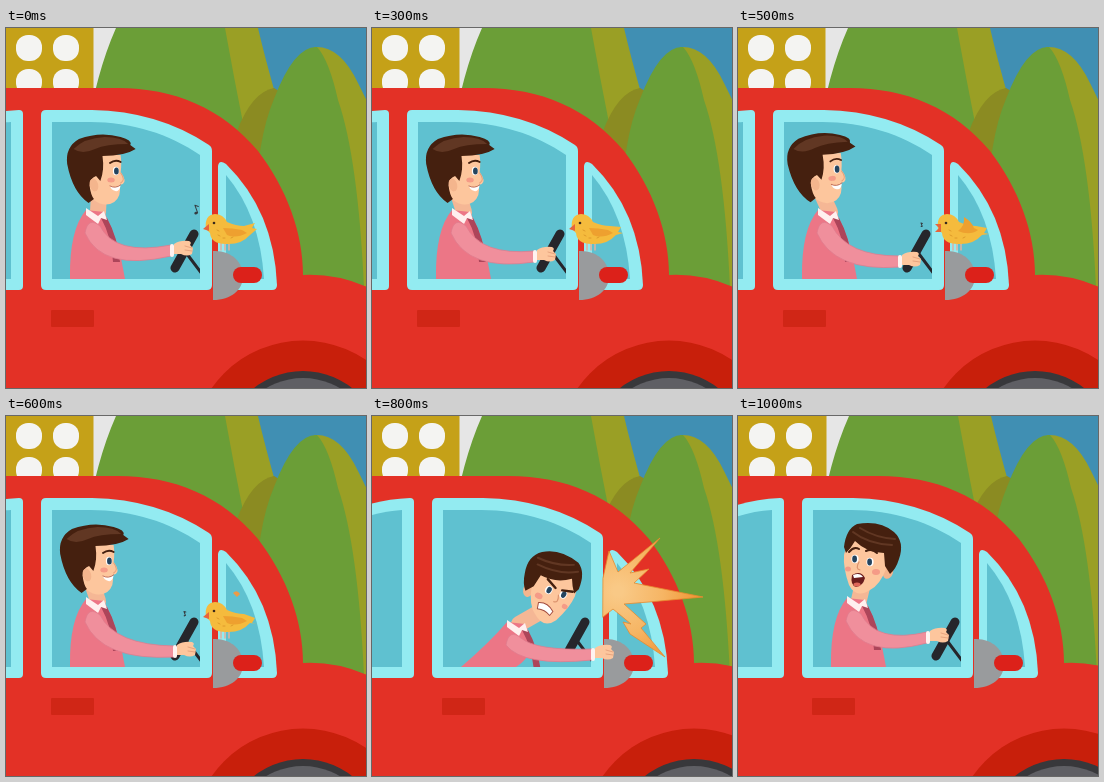
Animation, 360 px wide and 360 px high, one loop 1.1 s. Source, as an HTML page with a canvas:

```html
<!DOCTYPE html>
<html lang="en">
<head>
<meta charset="utf-8">
<title>Driver and bird</title>
<style>
html, body { margin: 0; width: 100%; height: 100%; overflow: hidden; background: #e33126; }
canvas { display: block; width: 360px; height: 360px; }
</style>
</head>
<body>
<canvas id="stage" width="360" height="360"></canvas>
<script>
const ctx = document.getElementById('stage').getContext('2d');
const RED = '#e33126', SKIN = '#fdc69d', HAIR = '#45200f', SHINE = '#613723', INK = '#26262b';
const SHIRT = '#ec7686', SLEEVE = '#f08f9c', GLASS = '#5fc1d0', FRAME = '#93ebf1';
const STEP = 100, LOOP = 1100;

function fill(color, d) {
  ctx.fillStyle = color;
  ctx.fill(new Path2D(d));
}
function line(color, width, d) {
  ctx.strokeStyle = color;
  ctx.lineWidth = width;
  ctx.stroke(new Path2D(d));
}
function oval(color, x, y, rx, ry = rx, turn = 0) {
  ctx.fillStyle = color;
  ctx.beginPath();
  ctx.ellipse(x, y, rx, ry, turn, 0, Math.PI * 2);
  ctx.fill();
}
function box(color, x, y, w, h, r) {
  ctx.fillStyle = color;
  ctx.beginPath();
  ctx.roundRect(x, y, w, h, r);
  ctx.fill();
}
function at(x, y, draw, turn = 0, sx = 1) {
  ctx.save();
  ctx.translate(x, y);
  ctx.rotate(turn);
  ctx.scale(sx, 1);
  draw();
  ctx.restore();
}

// car shift, head x/y, head turn, hand x/y, neck x/y
const poses = [
  [0, 1, 0, 0, 178, 220, 88, 180],
  [0, -2, 0, 0, 177, 222, 88, 180],
  [0, -4, 0, 0, 176, 224, 88, 180],
  [0, -6, 0, 0, 175, 226, 88, 180],
  [0, -8, 0, -.02, 174, 229, 88, 180],
  [0, -9, -1, -.04, 174, 231, 88, 180],
  [0, -6, 2, 0, 181, 233, 88, 181],
  [15, 27, 13, 0, 194, 237, 110, 193],
  [25, 154, 174, .5, 208, 236, 118, 204],
  [27.5, 122, 158, .15, 187, 228, 102, 191],
  [29, 101, 145, 0, 173, 219, 88, 180]
].map(([dx, hx, hy, turn, handX, handY, nx, ny], i) =>
  ({ dx, hx, hy, turn, handX, handY, nx, ny, front: i > 7, angry: i === 7 || i === 8 }));

function scenery() {
  ctx.fillStyle = '#e6e6e6';
  ctx.fillRect(-5, 0, 370, 360);
  ctx.fillStyle = '#c5a118';
  ctx.fillRect(-5, 0, 92.5, 70);
  for (const x of [23, 60]) for (const y of [20, 54]) box('#f4f4f2', x - 13, y - 13, 26, 26, 12);
  fill('#408fb3', 'M240 0H365V150H240Z');
  fill('#9a9f25', 'M215 0H252Q259 30 271 72L300 200H220Z');
  fill('#6b9e37', 'M110 0H219Q228 50 238 100L245 190H80V110Q90 45 110 0Z');
  fill('#8b8b22', 'M268 60Q246 64 231 103L262 150L285 70Z');
  fill('#9a9f25', 'M308 19Q334 17 352 55Q358 67 368 88V270H310Z');
  fill('#6b9e37', 'M311 19Q288 18 268 71Q251 110 248 190L290 260H358Q352 130 332 72Q323 32 311 19Z');
}

function bodywork() {
  fill(RED, 'M-60 60H112C168 60 216 80 252 123C281 161 297 205 297 247Q335 245 372 264V360H-60Z');
  oval('#c81f0b', 297, 424, 111.5);
  oval('#38383b', 297, 422, 79);
  oval('#5f5f64', 297, 422, 72);
  fill(FRAME, 'M-60 102Q-30 84 13 82Q17 82 17 86V258Q17 262 13 262H-60Z');
  fill(GLASS, 'M-60 115Q-30 96 5 94V251H-60Z');
  box('#d02616', 45, 282, 43, 17, 1);
}

const FRONT = 'M46 94H84C126 94 163 106 194 127V251H46Z';
const SIDE = 'M220 147Q254 187 258 251H220Z';

function frames() {
  fill(FRAME, 'M40 82H86Q152 83 203 117Q206 119 206 123V257Q206 262 201 262H40Q35 262 35 257V87Q35 82 40 82Z');
  fill(GLASS, FRONT);
  fill(FRAME, 'M212 138Q213 131 220 136Q268 183 271 257Q271 262 266 262H212Z');
  fill(GLASS, SIDE);
}

function mirror() {
  fill('#999b9d', 'M207 223C225 222 237 234 237 248S225 272 207 272Z');
  box('#dc211a', 227, 239, 29, 16, 8);
}

function wheel() {
  line(INK, 3, 'M181 226L196 246');
  line(INK, 9, 'M188 206L169 240');
}

function torso({ nx, ny, hx, hy, front }) {
  const chin = front ? `${hx - 4} ${hy + 18}` : `${92 + hx} ${165 + hy}`;
  line('#f5b795', 16, `M${nx + 4} ${ny + 4}L${chin}`);
  fill(SHIRT, `M64 251Q${nx - 25} ${ny + 22} ${nx - 8} ${ny + 2}L${nx + 10} ${ny + 4}Q${nx + 25} ${ny + 32} 119 251Z`);
  at(nx, ny, () => {
    fill('#ad455a', 'M7 10L13 10Q24 30 26 54L19 54Q18 30 7 10Z');
    fill('#fff0ef', 'M-8 0L4 8L10 3L13 12L7 10L4 16L-8 7Z');
  });
}

function arm({ nx, ny, handX, handY }) {
  const elbow = Math.min(ny + 56, 243);
  const wx = handX - 13, wy = handY + 2;
  const sleeve = `M${nx + 6} ${ny + 18}Q${nx + 21} ${elbow - 8} ${wx} ${wy - 5}L${wx} ${wy + 6}`
    + `Q${nx + 8} ${elbow + 8} ${nx - 9} ${ny + 25}Q${nx - 6} ${ny + 8} ${nx + 6} ${ny + 18}Z`;
  fill(SLEEVE, sleeve);
  line('#e07d8e', .8, sleeve);
  line('#fff2f0', 4, `M${wx + 1} ${wy - 4}V${wy + 5}`);
  at(handX, handY, () => {
    fill(SKIN, 'M-10 -4Q-4 -8 5 -7Q8 -6 6 -3L9 0L8 6Q3 9 -3 6L-10 6Z');
    line('#e7a47f', 1, 'M1 -2L8 0M1 2L8 3');
  });
}

function sideHead(angry) {
  fill(SKIN, 'M82 127H112Q113 137 112 144Q118 153 114 156L111 157Q113 168 106 174Q97 180 87 172L79 157Z');
  fill(HAIR, 'M62 136Q60 119 73 111Q93 103 112 109Q123 112 121 117L126 121Q116 128 95 128Q97 142 93 153L89 148Q83 150 83 158Q84 167 87 171L82 175Q67 164 62 136Z');
  fill(SHINE, 'M68 121Q78 110 97 109Q113 109 119 116Q98 116 88 121Q76 127 68 121Z');
  oval('#f4b58d', 87, 157, 4, 6.5, -.2);
  oval('#f59b87', 103, 152, 3.5, 2.5);
  oval('#ffffff', 107.5, 143, 2.8, 4.2);
  oval('#24445f', 108, 143, 2.2, 3.6);
  line('#e5a27b', 1, 'M112 145Q117 152 112 155');
  if (angry) {
    line(HAIR, 2.5, 'M101 134L112 140');
    fill('#ffffff', 'M100 162Q106 157 112 161L110 167Q104 165 99 168Z');
    line('#a34c3f', 1, 'M100 162Q106 157 112 161L110 167Q104 165 99 168Z');
  } else {
    line(HAIR, 1.8, 'M102 135Q107 131 112 134');
    fill('#ffffff', 'M102 158Q107 161 112 157Q111 164 107 163Q103 162 102 158Z');
    line('#b45b49', .8, 'M102 158Q107 161 112 157');
  }
}

function frontHead(angry) {
  oval('#f4b58d', 20, 11, 5, 7, .3);
  fill(SKIN, 'M-20 -22H18V8Q12 24 2 29Q-12 38 -19 24Q-25 7 -24 -6Z');
  fill(HAIR, 'M-24 -14Q-22 -32 -11 -37Q12 -41 26 -29Q37 -19 31 -2Q28 8 22 13L17 5L16 -8Q-1 -8 -13 -20Q-17 -13 -22 -8Z');
  line(SHINE, 2, 'M-15 -29Q0 -17 24 -16M-8 -33Q8 -23 27 -22');
  oval('#f59b87', -20, 8, 3, 2.5);
  oval('#f59b87', 8, 11, 4, 3);
  for (const [x, y] of [[-13, -2], [2, 1]]) {
    oval('#ffffff', x, y, 3.6, 4.2);
    oval('#24445f', x - .4, y, 2.4, 3.4);
  }
  line('#dc936e', 1.2, 'M-9 1Q-13 8 -8 9');
  if (angry) {
    line(HAIR, 2.4, 'M-20 -9L-10 -5M-3 -4L8 -8');
    const teeth = 'M-12 18Q-3 12 5 17L3 23Q-4 20 -11 23Z';
    fill('#ffffff', teeth);
    line('#a34c3f', 1, teeth);
  } else {
    line(HAIR, 2, 'M-19 -9Q-14 -15 -9 -12M-2 -10Q4 -13 9 -8');
    fill('#6b1d1d', 'M-16 14Q-7 9 -3 17Q-5 25 -12 26Q-18 24 -16 14Z');
    fill('#ffffff', 'M-15 14Q-8 11 -5 16L-14 17Z');
    oval('#dd6659', -11, 23.5, 3.5, 2);
  }
}

function head({ hx, hy, turn, front, angry }) {
  if (front) {
    at(hx, hy, () => frontHead(angry), turn, angry ? -1 : 1);
  } else {
    at(88 + hx, 175 + hy, () => at(-88, -175, () => sideHead(angry)), turn, 1.07);
  }
}

function bird(tail, open, wingUp) {
  line('#d9b3a4', 1.6, 'M-7 10V20M-3 11V20M1 11V20');
  fill('#f5bb3d', `M-22 -1Q-24 -15 -13 -16Q-5 -16 -1 -8Q8 -4 16 -4L27 ${tail - 3}L24 ${tail + 2}L29 ${tail + 3}L22 5Q13 15 -2 14Q-17 14 -18 3Z`);
  fill('#eea02f', wingUp ? 'M-2 1Q5 -4 4 -13Q12 -8 14 -2L18 0Q10 6 -2 1Z' : 'M-5 -2Q4 -2 14 0L19 3Q8 9 -1 5Z');
  fill('#e8643b', open ? 'M-19 -6L-25 -6L-21 -2L-25 2L-19 2Z' : 'M-19 -6L-25 -1L-19 1Z');
  oval('#39291c', -14, -7, 1.3);
  line('#d99428', .8, 'M-10 5l2 1M-5 8l2 0M3 8l2 -1M-11 0l2 1');
}

function note(x, y, s) {
  at(x, y, () => {
    oval('#343b40', 0, 3 * s, 1.7 * s, 1.2 * s);
    line('#343b40', 1, `M${1.4 * s} ${3 * s}V${-4 * s}L${4 * s} ${-2 * s}`);
  }, -.35);
}

function feather(x, y) {
  fill('#ed9b45', `M${x - 4} ${y - 1}Q${x} ${y - 5} ${x + 3} ${y}L${x} ${y + 3}Z`);
}

function burst() {
  const glow = ctx.createRadialGradient(246, 175, 5, 246, 175, 85);
  glow.addColorStop(0, '#f9c986');
  glow.addColorStop(.5, '#f6b564');
  glow.addColorStop(1, '#ef922f');
  const d = 'M231 162L237 135L246 156L288 122L258 157L277 153L262 167L331 181L277 186L252 188L274 208L269 212L293 241L258 218L251 206L259 208L241 193L231 201Z';
  fill(glow, d);
  line('#e88b2f', .8, d);
}

function birdLayer(step) {
  if (step < 7) {
    const tails = [-4, -3, -2, 0, -2, 1, 3];
    at(222, 202, () => bird(tails[step], step === 5, step === 5 || step === 4));
    if (step === 0) note(189, 182, 1.1);
    if (step === 1) note(187, 187, .8);
    if (step === 4) note(187, 193, .6);
    if (step === 5) note(183, 197, .5);
    if (step === 6) {
      note(178, 198, .6);
      feather(231, 178);
    }
  } else if (step === 7) {
    at(302, 183, () => bird(-2, false, true), -.12, -1);
    feather(229, 178);
  } else if (step === 8) {
    burst();
  }
}

function paint(step) {
  const p = poses[step];
  ctx.lineCap = ctx.lineJoin = 'round';
  at(step === 10 ? 1 : 0, 0, scenery);
  at(p.dx, 0, () => {
    bodywork();
    frames();
    ctx.save();
    ctx.clip(new Path2D(FRONT));
    torso(p);
    head(p);
    wheel();
    ctx.restore();
    mirror();
    arm(p);
  });
  birdLayer(step);
}

function tick() {
  paint(Math.floor(performance.now() % LOOP / STEP));
  requestAnimationFrame(tick);
}
tick();
</script>
</body>
</html>
```
